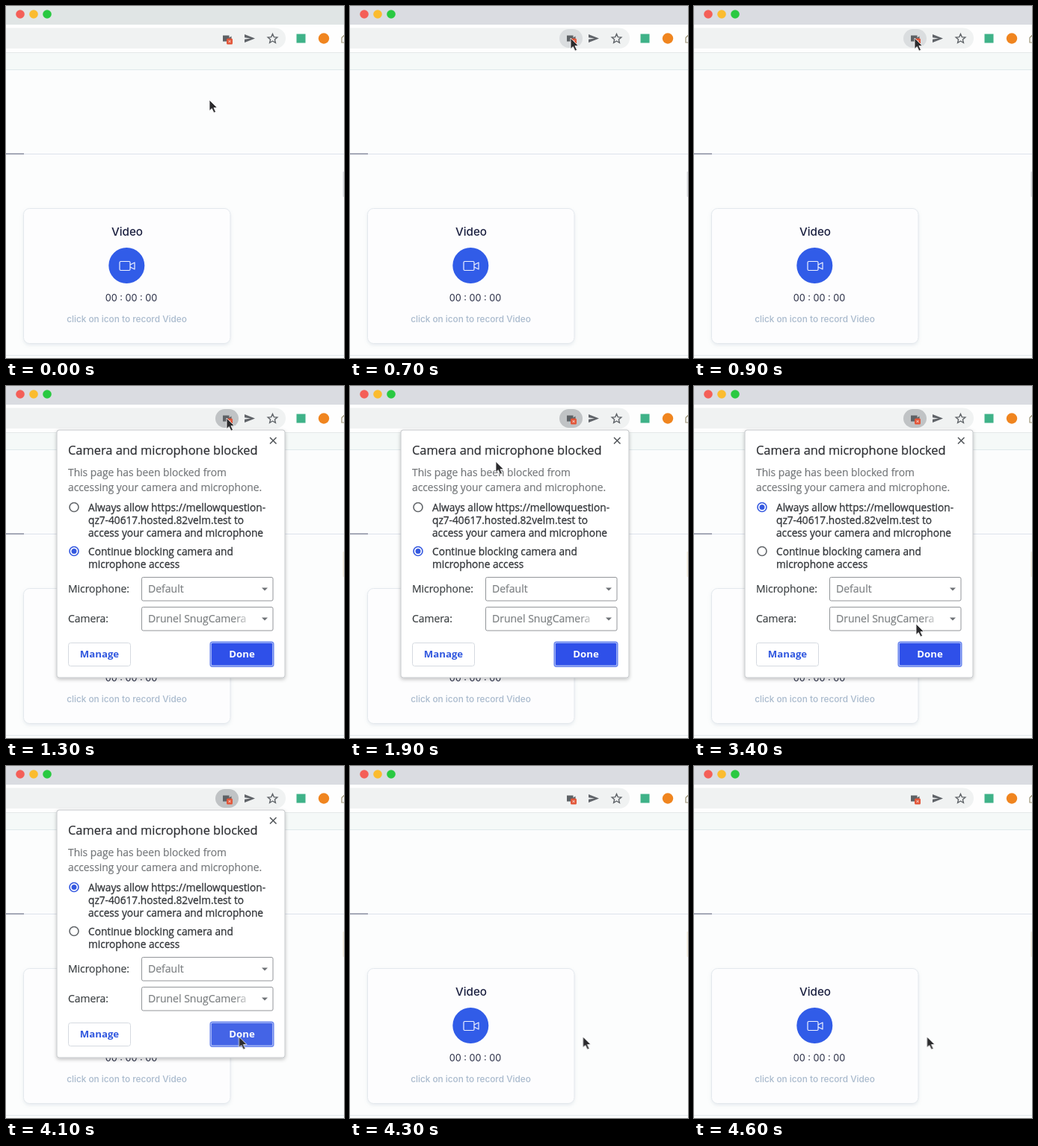
Recreate the animation shown at these times as an HTML page. Size 452 by 472 pixels, loop 4700 ms.

```html
<!DOCTYPE html>
<html lang="en">
<head>
<meta charset="utf-8">
<title>Camera permission</title>
<style>
html, body { margin: 0; width: 100%; height: 100%; overflow: hidden; background: #fcfdfd; }
svg { display: block; width: 452px; height: 472px; }
text { white-space: pre; }

.page text { font-family: Inter, sans-serif; text-anchor: middle; }
.dialog text {
  font-family: "Open Sans", "Noto Sans", sans-serif; font-size: 13.9px;
  fill: #3c4043; stroke: #3c4043; stroke-width: .2px;
}
.dialog .title { font-size: 16.4px; fill: #303236; stroke: #303236; stroke-width: .25px; }
.dialog .note text { font-size: 13.8px; fill: #74777a; stroke: #74777a; }
.dialog .choice text { font-size: 13.7px; fill: #34373b; stroke: #34373b; stroke-width: .3px; }
.dialog .value text { font-size: 14px; fill: #7d8083; stroke: #7d8083; }
.dialog .button { font-size: 13.2px; font-weight: 700; text-anchor: middle; stroke: none; }

/* One 4.7 s loop; every segment advances in 100 ms steps. */
.tabs, .hover, .dialog, .before, .after, .done, .edge, .cursor {
  animation: 4.7s step-end infinite;
}
.tabs { animation-name: tabs; }
.edge { animation-name: edge; }
.hover { animation-name: hover; }
.dialog { animation-name: dialog; }
.before { animation-name: before; }
.after { animation-name: after; }
.done { animation-name: done; }
.cursor { animation-name: move; }

@keyframes tabs { 0% { fill: #e0e5e5; } 2.12%, 100% { fill: #dadce1; } }
@keyframes edge { 0% { fill: #d9dce0; } 21.27%, 100% { fill: #f1ebdd; } }
@keyframes hover {
  0% { fill: #dadddf; opacity: 0; }
  10.63% { fill: #dadddf; opacity: 1; }
  21.27% { fill: #c0c3c5; opacity: 1; }
  91.48%, 100% { fill: #c0c3c5; opacity: 0; }
}
@keyframes dialog {
  0% { visibility: hidden; }
  21.27% { visibility: visible; }
  91.48%, 100% { visibility: hidden; }
}
@keyframes before { 0% { opacity: 1; } 57.44%, 100% { opacity: 0; } }
@keyframes after { 0% { opacity: 0; } 57.44%, 100% { opacity: 1; } }
@keyframes done { 0% { fill: #2f50e9; } 78.72%, 100% { fill: #4464e6; } }
@keyframes move {
  0% { transform: translate(272px, 126px); animation-timing-function: steps(2); }
  4.25% { transform: translate(278px, 108px); animation-timing-function: steps(3); }
  10.63% { transform: translate(294px, 48px); }
  12.76% { transform: translate(295px, 43px); }
  31.91% { transform: translate(295px, 43px); animation-timing-function: steps(3); }
  38.29% { transform: translate(225px, 85px); animation-timing-function: steps(4); }
  46.8% { transform: translate(105px, 150px); animation-timing-function: steps(2); }
  51.06% { transform: translate(89px, 158px); }
  61.7% { transform: translate(89px, 158px); animation-timing-function: steps(3); }
  68.08% { transform: translate(230px, 270px); animation-timing-function: steps(2); }
  72.34% { transform: translate(297px, 319px); animation-timing-function: steps(3); }
  78.72%, 100% { transform: translate(311.5px, 363px); }
}
</style>
</head>
<body>
<svg viewBox="0 0 452 472">
  <defs>
    <filter id="soft" x="-10%" y="-10%" width="120%" height="125%">
      <feDropShadow dx="0" dy="2" stdDeviation="2.5" flood-color="#000" flood-opacity=".24"/>
    </filter>
    <filter id="faint" x="-5%" y="-5%" width="110%" height="115%">
      <feDropShadow dx="0" dy="2" stdDeviation="2" flood-color="#93a5b8" flood-opacity=".2"/>
    </filter>
    <linearGradient id="fade">
      <stop offset=".55" stop-color="#fff" stop-opacity="0"/>
      <stop offset="1" stop-color="#fff"/>
    </linearGradient>
    <circle id="off" r="6" fill="#fff" stroke="#62666a" stroke-width="1.6"/>
    <g id="on">
      <circle r="6" fill="#fff" stroke="#3559e0" stroke-width="1.6"/>
      <circle r="3.5" fill="#3559e0"/>
    </g>
    <g id="select">
      <rect x="181.5" y=".5" width="175.5" height="31.5" rx="2" fill="#fff" stroke="#929599"/>
      <path d="M342 14.5h8l-4 4z" fill="#6d7175"/>
    </g>
  </defs>

  <g class="page">
    <rect width="452" height="472" fill="#fcfdfd"/>
    <path d="M0 198.5H452" stroke="#dde2ed"/>
    <path d="M0 198.2H24" stroke="#5a5f78"/>
    <path d="M0 468.5H452" stroke="#e2e9ed"/>
    <rect class="edge" x="450.5" y="222" width="3" height="34" rx="1"/>
    <rect x="23.5" y="271.5" width="276.5" height="181" rx="8" fill="#fdfdfe" stroke="#e3e8ed" filter="url(#faint)"/>
    <text x="162" y="308" font-size="15.2" font-weight="500" fill="#1b2040">Video</text>
    <circle cx="161.3" cy="348" r="24" fill="#315ce8"/>
    <g fill="none" stroke="#eef2ff" stroke-width="1.2" stroke-linejoin="round">
      <rect x="152" y="342.5" width="14" height="12" rx="1.5"/>
      <path d="M166 347l6-3v9l-6-3"/>
    </g>
    <text x="167.5" y="396" font-size="12.7" fill="#262b43">00 : 00 : 00</text>
    <text x="161.5" y="423.5" font-size="11.8" font-weight="500" fill="#a9bacd">click on icon to record Video</text>
  </g>

  <g>
    <rect class="tabs" width="452" height="25"/>
    <circle cx="19" cy="11" r="5.8" fill="#f45f58"/>
    <circle cx="37" cy="11" r="5.8" fill="#fbbc2f"/>
    <circle cx="55" cy="11" r="5.8" fill="#29c941"/>
    <rect y="25" width="452" height="37" fill="#fefefe"/>
    <rect x="-20" y="29.5" width="394" height="27.5" rx="13.75" fill="#f0f2f2"/>
    <rect y="62" width="452" height="23" fill="#f5f9f8"/>
    <path d="M0 62.5H452" stroke="#e5e9e9"/>
    <path d="M0 85.5H452" stroke="#dfe8eb"/>
    <rect class="hover" x="280" y="31" width="31" height="25" rx="12.5"/>
    <path d="M290 39.5h8.5v3l3-2v8h-3v-1H290z" fill="#5d6165"/>
    <rect x="295" y="43.5" width="8" height="8" rx="1.5" fill="#e2573a"/>
    <path d="M297.5 46l3 3m0-3l-3 3" stroke="#f6d8d0"/>
    <path d="M319 38l14 5.5-14 5.5v-4.3l8-1.2-8-1.2z" fill="#5f6368"/>
    <path d="M356.5 37.5l1.8 4.1 4.5.4-3.4 2.9 1 4.4-3.9-2.3-3.9 2.3 1-4.4-3.4-2.9 4.5-.4z" fill="none" stroke="#5f6368" stroke-width="1.4"/>
    <rect x="388.5" y="37.5" width="12" height="12" fill="#3fb288"/>
    <circle cx="425" cy="43.5" r="7.2" fill="#f0851f"/>
    <path d="M454 37.5l-5 5v6.5h5" fill="none" stroke="#9b9273" stroke-width="1.2"/>
  </g>

  <g class="dialog">
    <rect x="68" y="59" width="305" height="332" rx="3" fill="#fff" stroke="#c3c6c9" filter="url(#soft)"/>
    <path d="M353 69l8.500 8.500m0-8.500l-8.500 8.500" stroke="#505458" stroke-width="1.500"/>
    <text class="title" x="83" y="92">Camera and microphone blocked</text>
    <g class="note">
      <text x="83" y="120.5">This page has been blocked from</text>
      <text x="83" y="141">accessing your camera and microphone.</text>
    </g>
    <g class="choice">
      <text x="110" y="168">Always allow https://mellowquestion-</text>
      <text x="110" y="185">qz7-40617.hosted.82velm.test to</text>
      <text x="110" y="202">access your camera and microphone</text>
      <text x="110" y="227">Continue blocking camera and</text>
      <text x="110" y="244">microphone access</text>
    </g>
    <g class="before">
      <use href="#off" x="91" y="162.5"/>
      <use href="#on" x="91" y="221.5"/>
    </g>
    <g class="after">
      <use href="#on" x="91" y="162.5"/>
      <use href="#off" x="91" y="221.5"/>
    </g>
    <text x="83" y="276.5">Microphone:</text>
    <text x="83" y="316.5">Camera:</text>
    <use href="#select" y="256"/>
    <use href="#select" y="296"/>
    <g class="value">
      <text x="190" y="277">Default</text>
      <text x="190" y="317">Drunel SnugCamera</text>
    </g>
    <rect x="276" y="300" width="54" height="24" fill="url(#fade)"/>
    <rect x="83.5" y="344.5" width="83" height="31" rx="3" fill="#fff" stroke="#d5dae0"/>
    <text class="button" x="125" y="364" style="fill:#3158df">Manage</text>
    <rect x="273.2" y="343.2" width="84.6" height="33" rx="3" fill="#bccafa" stroke="#6b87ee" stroke-width="1.5"/>
    <rect class="done" x="274.8" y="344.8" width="81.4" height="29.8" rx="1.5"/>
    <text class="button" x="315.5" y="364" style="fill:#fff">Done</text>
  </g>

  <path class="cursor" d="M0 0v14.500l3.300-3 2.700 5.700 2.500-1.200-2.600-5.500h4.600z" fill="#2b2b2d" stroke="#fff" stroke-width=".8"/>
</svg>
</body>
</html>
```
